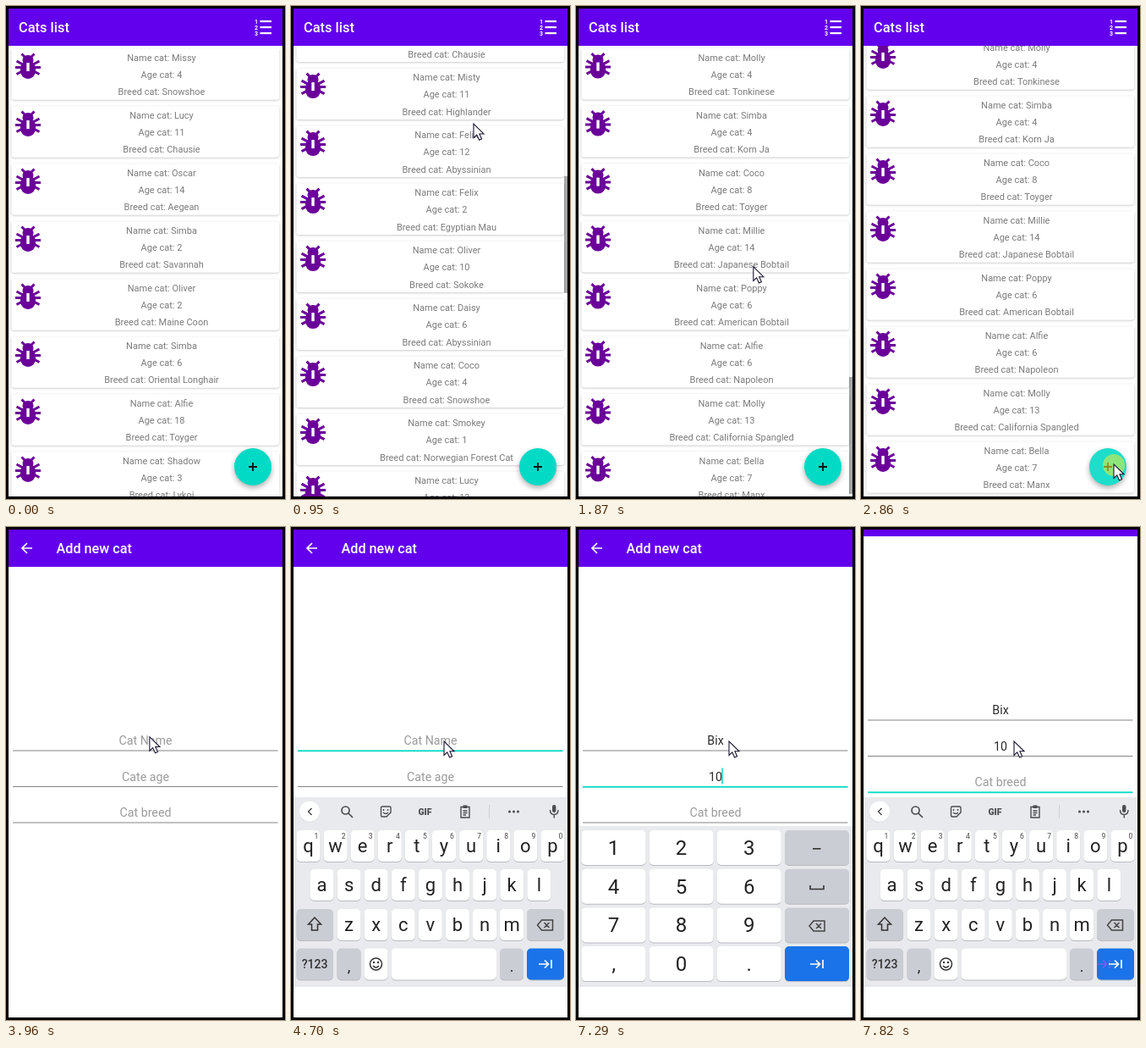
Recreate the animation shown at these times as an HTML page with a canvas. Size 330x582 px, loop 8000 ms.

```html
<!DOCTYPE html>
<html lang="en">
<head>
<meta charset="utf-8">
<title>Cats list</title>
<style>
  html, body { margin: 0; width: 100%; height: 100%; overflow: hidden; background: #000; }
  canvas { display: block; width: 330px; height: 582px; }
</style>
</head>
<body>
<canvas id="stage" width="330" height="582"></canvas>
<script>
const c = document.getElementById('stage').getContext('2d');
const LOOP = 8000, MAX_SCROLL = 1508, PITCH = 68;
const PURPLE = '#6200ee', TEAL = '#03dac5', INK = '#222', GREY = '#cbcdd4', BLUE = '#1a73e8';

const cats = `Missy,4,Snowshoe;Lucy,11,Chausie;Oscar,14,Aegean;Simba,2,Savannah;Oliver,2,Maine Coon
Simba,6,Oriental Longhair;Alfie,18,Toyger;Shadow,3,Lykoi;Lily,7,Chausie;Misty,11,Highlander
Felix,12,Abyssinian;Felix,2,Egyptian Mau;Oliver,10,Sokoke;Daisy,6,Abyssinian;Coco,4,Snowshoe
Smokey,1,Norwegian Forest Cat;Lucy,13,Ocicat;Lucky,13,Exotic Shorthair;Smokey,17,Oriental Bicolor;Coco,16,American Shorthair
Oliver,10,Siamese;Missy,16,Ragamuffin;Molly,4,Tonkinese;Simba,4,Korn Ja;Coco,8,Toyger
Millie,14,Japanese Bobtail;Poppy,6,American Bobtail;Alfie,6,Napoleon;Molly,13,California Spangled;Bella,7,Manx`
  .split(/[;\n]/).map(s => s.split(','));

// Keyframes: [time, value, value...]
const scrollKeys = [[400, 0], [480, 70], [760, 410], [950, 588], [1160, 775], [1370, 942],
  [1440, 990], [1650, 1330], [1780, 1460], [1900, MAX_SCROLL]];
const cursorKeys = [[70, 237, 572], [210, 205, 552], [400, 207, 552], [760, 215, 150], [950, 216, 139],
  [1020, 214, 150], [1300, 183, 500], [1370, 181, 507], [1430, 181, 500], [1650, 190, 160], [1720, 192, 165],
  [2000, 225, 430], [2400, 270, 510], [2650, 299, 541], [3290, 299, 541], [3560, 225, 385],
  [3800, 152, 262], [3900, 160, 243], [4030, 181, 253]];

const clamp = v => Math.max(0, Math.min(1, v));
const easeOut = v => 1 - (1 - clamp(v)) ** 3;

function at(keys, t) {
  const i = keys.findIndex(k => k[0] > t);
  if (i === 0) return keys[0].slice(1);
  if (i < 0) return keys[keys.length - 1].slice(1);
  const a = keys[i - 1], b = keys[i], p = (t - a[0]) / (b[0] - a[0]);
  return a.slice(1).map((v, n) => v + (b[n + 1] - v) * p);
}

function text(s, x, y, size, color, align = 'center', weight = 400) {
  c.font = `${weight} ${size}px Roboto, sans-serif`;
  c.textAlign = align;
  c.fillStyle = color;
  c.fillText(s, x, y);
}

function rect(x, y, w, h, color) {
  c.fillStyle = color;
  c.fillRect(x, y, w, h);
}

function round(x, y, w, h, r, color) {
  c.beginPath();
  c.roundRect(x, y, w, h, r);
  c.fillStyle = color;
  c.fill();
}

function disc(x, y, r, color) {
  c.beginPath();
  c.arc(x, y, r, 0, 7);
  c.fillStyle = color;
  c.fill();
}

function stroke(d, color, width, x = 0, y = 0) {
  c.save();
  c.translate(x, y);
  c.strokeStyle = color;
  c.lineWidth = width;
  c.stroke(new Path2D(d));
  c.restore();
}

function shadow(color, blur, dy) {
  c.shadowColor = color;
  c.shadowBlur = blur;
  c.shadowOffsetY = dy;
}

function bug(y) {
  const color = '#6a0099';
  stroke('M23-10 18.5-14.5M29-10 33.5-14.5M11 1.5H41M20-2 12.5-6M32-2 39.5-6M20 5.5 12.5 9.5M32 5.5 39.5 9.5', color, 3, 0, y);
  round(17, y - 6.5, 18, 21.5, 9, color);
  round(19.5, y - 13, 13, 12, 6, color);
  rect(24.3, y - 4, 3.4, 10, '#fff');
}

function listScreen(t, scroll) {
  rect(3, 3, 324, 576, '#fff');
  c.save();
  c.beginPath();
  c.rect(3, 47, 324, 532);
  c.clip();
  cats.forEach(([name, age, breed], i) => {
    const y = 50 + i * PITCH - scroll;
    if (y < -30 || y > 582) return;
    c.save();
    shadow('rgba(0,0,0,.24)', 2.5, 0.8);
    round(6.5, y + 0.3, 316.5, 60.5, 3, '#fff');
    c.restore();
    bug(y + 21);
    text('Name cat: ' + name, 184, y + 15, 11, '#7b7b7b');
    text('Age cat: ' + age, 184, y + 35.2, 11, '#7b7b7b');
    text('Breed cat: ' + breed, 184, y + 55.4, 11, '#7b7b7b');
  });
  const bar = clamp((t - 400) / 70) * clamp((2450 - t) / 250);
  if (bar) rect(323, 47 + scroll / MAX_SCROLL * 394, 4, 138, `rgba(0,0,0,${.34 * bar})`);
  const glow = clamp((t - 1900) / 150) * clamp((2550 - t) / 400);
  if (glow) {
    c.beginPath();
    c.ellipse(165, 579, 185, 38 * glow, 0, 0, 7);
    c.fillStyle = `rgba(98,0,238,${.13 * glow})`;
    c.fill();
  }
  c.restore();

  rect(3, 3, 324, 44, PURPLE);
  text('Cats list', 15, 31, 16.4, '#fff', 'left', 500);
  ['1', '2', '3'].forEach((n, i) => {
    text(n, 296, 20.5 + i * 7, 7, '#fff', 'center', 700);
    rect(300.5, 17 + i * 7, 13.5, 2.2, '#fff');
  });

  c.save();
  shadow('rgba(0,0,0,.32)', 6, 3);
  disc(292, 544, 22, TEAL);
  c.restore();
  stroke('M287 544H297M292 539V549', '#111', 1.8);
  if (t >= 2770) {
    disc(292, 544, 22, 'rgba(255,255,255,.1)');
    disc(299, 542, 13, 'rgba(255,235,40,.5)');
  }
}

function field(y, value, hint, focused, caret) {
  text(value || hint, 165, y + 5, 14.2, value ? '#2b2b2b' : '#9b9b9b');
  const half = value ? c.measureText(value).width / 2 : 0;
  if (caret) rect(164.3 + half, y - 10, 1.5, 19, TEAL);
  if (focused) rect(8, y + 11.4, 313.5, 1.8, TEAL);
  else rect(8, y + 11.5, 313.5, 1, '#858585');
}

function formScreen(t) {
  const pan = 36 * easeOut((t - 7360) / 270);
  const name = t < 5100 ? '' : 'Bix'.slice(0, t < 5300 ? 1 : t < 5570 ? 2 : 3);
  const age = t < 6500 ? '' : t < 6890 ? '1' : '10';
  const focus = t < 4160 ? -1 : t < 5900 ? 0 : t < 7330 ? 1 : 2;
  const caretOff = (t >= 4700 && t < 5030) || t >= 7820;
  rect(3, 3, 324, 576, '#fff');
  c.save();
  c.translate(0, -pan);
  rect(3, 3, 324, 44, PURPLE);
  stroke('M31 25H19M25 19 19 25 25 31', '#fff', 1.7);
  text('Add new cat', 59.5, 31, 16.2, '#fff', 'left', 500);
  [[252, name, 'Cat Name'], [294.5, age, 'Cate age'], [337, '', 'Cat breed']].forEach((f, i) =>
    field(...f, focus === i, focus === i && !caretOff));
  c.restore();
  if (t >= 4300) {
    c.save();
    c.translate(0, 260 * (1 - easeOut((t - 4300) / 260)));
    if (t >= 5950 && t < 7360) numberPad();
    else letterPad(t);
    c.restore();
  }
}

function key(x, y, w, h, color, label, size = 22, dy = 8) {
  round(x, y + 1, w, h, 5, '#b9bbc1');
  round(x, y, w, h, 5, color);
  if (label) text(label, x + w / 2, y + h / 2 + dy, size, INK);
}

const tabArrow = (x, y, color) => stroke('M-8 0H3M-1-4.5 3.5 0-1 4.5M7-5V5', color, 1.7, x, y);
const eraser = (x, y) => stroke('M-9 0-4-6H9V6H-4ZM-1-3 5 3M5-3-1 3', '#444', 1.5, x, y);

function padBase(top) {
  rect(3, top, 324, 579 - top, '#e8eaed');
  rect(3, 542, 324, 37, '#fff');
  rect(3, 541.5, 324, 1, '#dcdee2');
}

function toolbar() {
  const ink = '#4a4c50';
  stroke('M24.5 332 20.5 336 24.5 340', ink, 1.5);
  stroke('M69 334.5A4.5 4.5 0 1 1 60 334.5A4.5 4.5 0 1 1 69 334.5M68 338 73 343', ink, 1.7);
  stroke('M108 330H116.5Q118 330 118 331.5V337L113 342H108Q106.5 342 106.5 340.5V331.5Q106.5 330 108 330ZM109 337Q112 340 115 337M109.5 333V335M114.5 333V335', ink, 1.4);
  text('GIF', 158.5, 340, 10.5, ink, 'center', 900);
  stroke('M201 330.5H211V343H201ZM203.5 335H208.5M203.5 337.5H208.5M203.5 340H207', ink, 1.4);
  rect(203.5, 328.5, 5, 3.5, ink);
  rect(234, 328, 1, 16, '#cfd1d6');
  [258.5, 263.5, 268.5].forEach(x => disc(x, 336, 1.5, ink));
}

function suggestions(words) {
  stroke('M20.5 332 24.5 336 20.5 340', '#4a4c50', 1.5);
  words.forEach((w, i) => text(w, 81 + i * 86.5, 341, 14, INK, 'center', i === 1 ? 500 : 400));
  [124, 211].forEach(x => rect(x, 328, 1, 16, '#cfd1d6'));
}

function letterPad(t) {
  const caps = t >= 5030 && t < 5100, step = 32.1;
  padBase(319);
  disc(22, 336.5, 12, '#d5d7db');
  disc(22, 335.7, 12, '#fff');
  if (t >= 5300 && t < 5950) suggestions(t < 5600 ? ['Bi', 'Big', 'Bit'] : ['Bix', 'Box', 'Big']);
  else toolbar();
  round(309, 328, 4.4, 9, 2.2, '#4a4c50');
  stroke('M306.5 334Q306.5 339.5 311.2 339.5T316 334M311.2 339.5V343.5', '#4a4c50', 1.4);

  [['qwertyuiop', 6.5, 358], ['asdfghjkl', 22.5, 404], ['zxcvbnm', 54.5, 451]].forEach(([row, x, y], r) =>
    [...row].forEach((ch, i) => {
      key(x + i * step, y, 28, 37, '#fff', caps ? ch.toUpperCase() : ch, 22, 7.5);
      if (!r) text((i + 1) % 10, x + i * step + 23.5, y + 9.5, 8.5, '#444');
    }));

  key(6.5, 451, 43.5, 37, GREY);
  const shift = 'M28 461 20.5 469H24.5V476H31.5V469H35.5Z';
  stroke(shift, '#333', 1.5);
  if (caps) { c.fillStyle = '#333'; c.fill(new Path2D(shift)); }
  key(279, 451, 44, 37, GREY);
  eraser(300.5, 470);

  key(6.5, 497.5, 43.5, 37, GREY);
  text('?123', 28, 521, 14, '#333', 'center', 500);
  key(54.5, 497.5, 28, 37, GREY, ',', 18, 9);
  key(86.5, 497.5, 28, 37, '#fff');
  stroke('M107.5 516A7 7 0 1 1 93.5 516A7 7 0 1 1 107.5 516M97 518Q100.5 522 104 518', '#333', 1.5);
  disc(98, 514, 1.2, '#333');
  disc(103, 514, 1.2, '#333');
  key(118.5, 497.5, 124.5, 37, '#fff');
  key(247, 497.5, 28, 37, GREY, '.', 18, 9);
  key(279, 497.5, 44, 37, BLUE);
  if (t >= 7360) tabArrow(287, 516, '#7c5cf0');
  tabArrow(301, 516, '#fff');
}

function numberPad() {
  padBase(353);
  ['123', '456', '789', ',0.'].forEach((row, r) => {
    const y = 358 + r * 45.7;
    [...row].forEach((ch, i) => key(6.5 + i * 80.1, y, 76, 41, '#fff', ch, 24, 8.5));
    key(247, y, 76, 41, r === 3 ? BLUE : GREY);
  });
  rect(280, 379, 9.5, 1.6, '#333');
  stroke('M277 423V427.5H293V423', '#333', 1.6);
  eraser(285, 471);
  tabArrow(285, 516, '#fff');
}

function cursor(x, y) {
  const arrow = new Path2D('M0 0V16.5L3.8 12.9 6.6 19 9.6 17.7 6.9 11.8H12Z');
  c.save();
  c.translate(x, y);
  c.fillStyle = '#fff';
  c.fill(arrow);
  c.strokeStyle = '#1b1430';
  c.lineWidth = 1.1;
  c.stroke(arrow);
  c.restore();
}

function draw(t) {
  rect(0, 0, 330, 582, '#000');
  c.save();
  c.beginPath();
  c.rect(3, 3, 324, 576);
  c.clip();
  const fade = clamp((t - 2890) / 170);
  if (fade < 1) listScreen(t, at(scrollKeys, t)[0]);
  if (fade > 0) {
    c.globalAlpha = fade;
    formScreen(t);
    c.globalAlpha = 1;
  }
  c.restore();
  if (t >= 70) cursor(...at(cursorKeys, t));
}

const start = performance.now();
function tick() {
  draw((performance.now() - start) % LOOP);
  requestAnimationFrame(tick);
}
tick();
</script>
</body>
</html>
```
